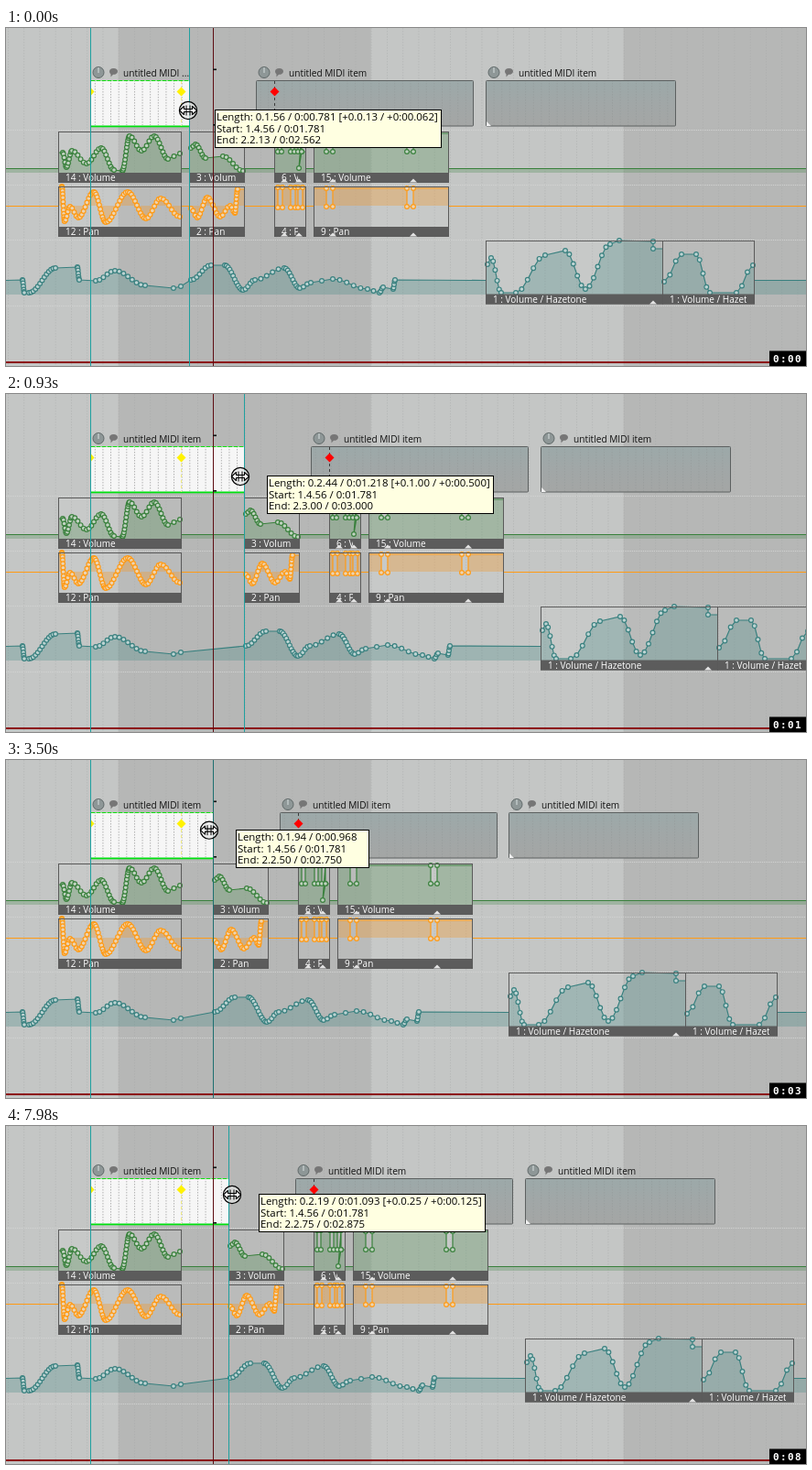
Animation of 874x369 px, one loop 8 s. Source, as an HTML page:

```html
<!DOCTYPE html>
<html lang="en">
<head>
<meta charset="utf-8">
<title>Item edge drag with ripple editing</title>
<style>
html, body { margin: 0; width: 100%; height: 100%; overflow: hidden; background: #b7b8b7; }
svg { display: block; }
text { font-family: "Open Sans", "Noto Sans", sans-serif; white-space: pre; }
.name { font-size: 10.15px; fill: #111; }
.label { font-size: 10px; fill: #fff; }
.tip { font-size: 11.45px; fill: #000; }
.clock { font: bold 11px "DejaVu Sans Mono", monospace; letter-spacing: 1.4px; fill: #fff; }
</style>
</head>
<body>
<script>
const W = 874, H = 369, LOOP = 8000, TICK = 135;
const START = 92.55, BEAT = 69, GRID = BEAT / 8, BAR_X = 122.7, PLAY_X = 226;
const GREEN = { line: '#39803c', fill: '#39803c', alpha: 0.26, dot: '#c0d2c0' };
const ORANGE = { line: '#ff9a14', fill: '#f09a30', alpha: 0.36, dot: '#ecd4b2' };
const TEAL = { line: '#39807f', fill: '#39807f', alpha: 0.27, dot: '#bcd3d2' };

// Pointer path: screen tick, x, y.
const POINTER = [[-1, 199, 90], [2, 222.4, 90], [6, 256, 90], [11, 257, 90], [14, 205, 89], [16, 223, 88],
  [18, 223, 88], [23, 222, 77], [29, 222, 76], [30, 222.5, 65], [36, 223, 67], [38, 222, 61],
  [47, 222, 80], [48, 217.5, 71], [53, 217.5, 71], [54, 230, 75], [58, 247, 75]];
// Edge drags in ticks; `base` is the item's length in grid steps at the press.
const DRAGS = [
  { from: -1, to: 19, grab: 190, base: 0 },
  { from: 25, to: 27, grab: 222, base: 4 },
  { from: 33, to: 36, grab: 222.5, base: 4 },
  { from: 56, to: 60, grab: 230, base: 4 }
];

function set(node, attrs) {
  for (const key in attrs) node.setAttribute(key, attrs[key]);
}
function el(parent, tag, attrs, text) {
  const node = document.createElementNS('http://www.w3.org/2000/svg', tag);
  set(node, attrs);
  if (text !== undefined) node.textContent = text;
  parent.appendChild(node);
  return node;
}
const rect = (parent, x, y, width, height, fill, more) =>
  el(parent, 'rect', { x, y, width, height, fill, ...more });
const line = (parent, x1, y1, x2, y2, stroke, more) =>
  el(parent, 'line', { x1, y1, x2, y2, stroke, ...more });
const path = (parent, d, more) => el(parent, 'path', { d, ...more });
const show = (node, on) => set(node, { display: on ? 'inline' : 'none' });
const move = (node, x, y) => set(node, { transform: `translate(${x} ${y})` });

// Eased curve through its turning points, with a node every `rise` pixels of height.
function wave(rise, ...knots) {
  const out = [knots[0]];
  for (let i = 1; i < knots.length; i++) {
    const [x0, y0] = knots[i - 1], [x1, y1] = knots[i];
    const n = Math.max(1, Math.round(Math.max(Math.abs(y1 - y0) / rise, (x1 - x0) / 25)));
    for (let k = 1; k <= n; k++) {
      const u = k / n;
      out.push([x0 + (x1 - x0) * u, y0 + (y1 - y0) * (1 - Math.cos(Math.PI * u)) / 2]);
    }
  }
  return out;
}
const trace = pts => 'M' + pts.map(p => p.join(' ')).join('L');
const area = (pts, y) => `${trace(pts)}L${pts[pts.length - 1][0]} ${y}L${pts[0][0]} ${y}Z`;

function dots(parent, pts, tone) {
  for (const [cx, cy] of pts) {
    el(parent, 'circle', { cx, cy, r: 2.4, fill: tone.dot, stroke: tone.line, 'stroke-width': 1.15 });
  }
}
// Automation item: curve, label bar and frame.
function block(parent, x, y, w, h, label, tone, floor, pts) {
  const full = [[x + 1, pts[0][1]], ...pts, [x + w - 1, pts[pts.length - 1][1]]];
  rect(parent, x, y, w, h, '#fff', { 'fill-opacity': 0.05 });
  path(parent, area(full, floor), { fill: tone.fill, 'fill-opacity': tone.alpha });
  path(parent, trace(full), { fill: 'none', stroke: tone.line, 'stroke-width': 1.2 });
  dots(parent, pts, tone);
  rect(parent, x, y + h - 11, w, 11, '#5c5c5c');
  const clip = el(parent, 'svg', { x: x + 8, y: y + h - 12, width: w - 17, height: 14 });
  el(clip, 'text', { x: 0, y: 10.3, class: 'label' }, label);
  rect(parent, x + 0.5, y + 0.5, w - 1, h - 1, 'none', { stroke: '#5a5a5a' });
}
const volume = (parent, x, w, label, pts) => block(parent, x, 113, w, 56, label, GREEN, 158, pts);
const pan = (parent, x, w, label, pts) => block(parent, x, 173, w, 55, label, ORANGE, 194, pts);
const synth = (parent, x, w, pts) => block(parent, x, 232, w, 69.5, '1 : Volume / Hazetone', TEAL, 291, pts);
const notch = (parent, x, y) => path(parent, `M${x - 4} ${y}l4 -4 4 4Z`, { fill: '#e4e4e4' });

function header(parent, x, name) {
  el(parent, 'circle', { cx: x + 9, cy: 48.5, r: 6, fill: '#8e9797', stroke: '#5f6868' });
  line(parent, x + 9, 43, x + 9, 49, '#d8e0e0');
  path(parent, `M${x + 21} 47.5a4.5 3.5 0 0 1 9 0a4.5 3.5 0 0 1 -5 3.3l-2.5 2.6v-3a4 3.5 0 0 1 -1.5 -2.9Z`,
    { fill: '#767676' });
  return el(parent, 'text', { x: x + 36, y: 53, class: 'name' }, name);
}
// Take marker with its dashed stem.
function marker(parent, x, fill, stem) {
  line(parent, x, 58, x, 107, stem, { 'stroke-dasharray': '3 3' });
  path(parent, `M${x} 64.5l5 5 -5 5 -5 -5Z`, { fill });
}

const svg = el(document.body, 'svg', { viewBox: `0 0 ${W} ${H}`, width: '100%', height: '100%' });
const defs = el(svg, 'defs');
function grid(id, x, width, color) {
  const p = el(defs, 'pattern', { id, x, y: 0, width, height: 3, patternUnits: 'userSpaceOnUse' });
  rect(p, 0, 0, 1, 1.5, color);
}
grid('back', BAR_X, GRID * 2, '#a2a4a3');
grid('light', BAR_X, GRID, '#b0b0b0');
grid('dim', 0, GRID, '#8b9090');
const shade = el(defs, 'linearGradient', { id: 'shade', x2: 0, y2: 1 });
['#9ca9a9', '#a1a7a7', '#a4a6a5'].forEach((color, i) => el(shade, 'stop', { offset: i / 2, 'stop-color': color }));

// Ruler stripes and tracks
rect(svg, 0, 0, W, H, '#c4c6c5');
for (const x of [BAR_X, BAR_X + 8 * BEAT]) rect(svg, x, 0, 4 * BEAT, H, '#b6b7b6');
rect(svg, 0, 0, W, H, 'url(#back)', { opacity: 0.4 });
for (const y of [111.5, 171.5, 231.5, 303.5]) line(svg, 0, y, W, y, '#d3d4d3', { 'stroke-dasharray': '1 1' });
rect(svg, 0, 364, W, 2, '#8c0a10');

// Lines of the envelopes outside their items
const volFill = path(svg, '', { fill: GREEN.fill, 'fill-opacity': GREEN.alpha });
const volLine = path(svg, '', { stroke: GREEN.line });
const panLine = path(svg, '', { stroke: ORANGE.line });
const synthFill = path(svg, '', { fill: TEAL.fill, 'fill-opacity': TEAL.alpha });
const synthLine = path(svg, '', { fill: 'none', stroke: TEAL.line, 'stroke-width': 1.1 });

// `near` and `far` follow the dragged edge, each snapped to whole pixels.
const fixed = el(svg, 'g'), near = el(svg, 'g'), far = el(svg, 'g');

volume(fixed, 57, 135, '14 : Volume', wave(3, [62, 136], [66, 152], [72, 134], [88, 148], [104, 131],
  [118, 155], [127, 156], [135, 118], [148, 134], [162, 118], [177, 143], [190, 137]));
pan(fixed, 57, 135, '12 : Pan', wave(3, [61, 173], [64, 211], [70, 195], [79, 207], [96, 179],
  [109, 212], [133, 179], [153, 208], [169, 186], [190, 206]));
volume(near, 0, 61, '3 : Volum', wave(2.6, [2, 131], [7, 127], [18, 142], [37, 140], [59, 156]));
pan(near, 0, 61, '2 : Pan', wave(3, [2, 197], [9, 207], [20, 185], [34, 206], [45, 194], [50, 202], [53, 176]));

// Square gates: down to `low` for a few pixels after each start.
const gates = (top, low, width, ...starts) =>
  starts.flatMap(x => [[x, top], [x, low], [x + width, low], [x + width, top]]);
volume(near, 93, 35, '6 : Volume', gates(114, 135, 4, 97, 111, 119).concat([[120, 153], [123, 135]]));
pan(near, 93, 35, '4 : Pan', gates(174, 196, 5, 97, 111, 119));
volume(near, 136, 148, '15 : Volume', gates(115, 135, 7, 150, 238));
pan(near, 136, 148, '9 : Pan', gates(175, 195, 7, 150, 238));
for (const x of [104, 120, 157, 245]) {
  notch(near, x, 168.5);
  notch(near, x, 227.5);
}
synth(far, 0, 194, wave(8, [2, 258], [6, 251], [17, 289], [33, 289], [65, 248], [87, 243], [109, 285],
  [136, 236], [146, 232], [183, 233], [183, 241]));
synth(far, 193, 101, wave(10, [195, 277], [214, 247], [230, 247], [245, 289], [274, 289], [292, 259]));
notch(far, 183, 301.5);

const synthA = wave(2.2, [18, 275], [20, 289], [25, 289], [54, 262], [78, 261], [80, 275], [98, 276],
  [119, 265], [152, 281], [183, 284], [191, 282]);
const synthB = wave(2.4, [2, 275], [24, 259], [39, 259], [59, 286], [72, 275], [104, 262], [121, 284],
  [133, 278], [157, 274], [195, 285], [208, 289], [212, 283], [223, 285], [225, 275]);
dots(fixed, synthA, TEAL);
dots(near, synthB, TEAL);

// Media items
function midi(parent, x, w) {
  const box = fill => [parent, x + 0.5, 57.5, w, 49.5, fill];
  rect(...box('url(#shade)'));
  rect(...box('url(#dim)'), { opacity: 0.4 });
  rect(...box('none'), { stroke: '#5c6060', rx: 1 });
  path(parent, `M${x + 1} 102l5 5h-5Z`, { fill: '#f2f2f2' });
  header(parent, x, 'untitled MIDI item');
}
midi(near, 73, 237);
midi(far, 0, 207);
marker(near, 93.5, '#f00', '#3c3c3c');

const body = rect(svg, START, 57, 0, 51, '#f6f6f6');
const bodyGrid = rect(svg, START, 58, 0, 48, 'url(#light)');
const bodyEdge = rect(svg, 92.5, 57.5, 0, 50, 'none', { stroke: '#12dc12', 'stroke-dasharray': '5 1' });
const bodyBase = rect(svg, START, 106.5, 0, 1.8, '#00e010');
path(svg, 'M92 64.5l4.5 5 -4.5 5Z', { fill: '#f8f000' });
marker(svg, 191.5, '#fff200', '#f0ec80');
const name = header(svg, 92, '');

// Play position, edge guides
line(svg, PLAY_X + 0.5, 0, PLAY_X + 0.5, H, '#5e0d12');
for (const y of [44.5, 105]) rect(svg, PLAY_X, y, 4, 1.6, '#111');
const bracket = rect(svg, PLAY_X + 0.8, 45, 1.5, 61, '#2a0a0c');
const guides = el(svg, 'g');
line(guides, 92.5, 0, 92.5, H, '#1fa09f');
const edgeGuide = line(guides, 0, 0, 0, H);

const tip = el(svg, 'g');
const tipBox = rect(tip, 0.5, 0.5, 0, 41, '#ffffe1', { stroke: '#000' });
const tipText = [12, 25, 37].map(y => el(tip, 'text', { x: 2, y, class: 'tip' }));

// Pointers
const ink = { fill: '#fff', stroke: '#000', 'stroke-width': 1.1, 'stroke-linejoin': 'round' };
const pointers = { drag: el(svg, 'g'), hover: el(svg, 'g'), arrow: el(svg, 'g') };
el(pointers.drag, 'circle', { r: 9.6, fill: '#e6e6e6', 'fill-opacity': 0.7, stroke: '#000', 'stroke-width': 1.2 });
path(pointers.drag, 'M-9.5 0l5 -4.5v3h9v-3l5 4.5 -5 4.5v-3h-9v3Z', ink);
path(pointers.drag, 'M-2 -5.5V5.5M2 -5.5V5.5', { stroke: '#000' });
path(pointers.hover, 'M-13 0l5 -4.5v3h16v-3l5 4.5 -5 4.5v-3h-16v3Z', ink);
path(pointers.hover, 'M-5.5 6V-6H2q3.5 1 3.5 5V6Z', ink);
path(pointers.arrow, 'M0 0V16.5l3.8 -3.6 3 7 2.6 -1.1 -3 -6.9h5.3Z', ink);

rect(svg, 834, 352.5, 40, 16.5, '#000');
const clock = el(svg, 'text', { x: 838, y: 364.5, class: 'clock' });

const pad = (n, size) => String(n).padStart(size, '0');
const beats = (b, first) =>
  `${Math.floor(b / 4) + first}.${Math.floor(b % 4) + first}.${pad(Math.round(b % 1 * 100), 2)}`;
const clockTime = s => `0:${pad(Math.floor(s), 2)}.${pad(Math.floor(s % 1 * 1000), 3)}`;
const both = (b, first) => `${beats(b, first)} / ${clockTime(b / 2)}`;

function pointerAt(tick) {
  const i = Math.max(1, POINTER.findIndex(p => p[0] >= tick));
  const [t0, x0, y0] = POINTER[i - 1], [t1, x1, y1] = POINTER[i];
  const u = (tick - t0) / (t1 - t0);
  return [x0 + (x1 - x0) * u, y0 + (y1 - y0) * u];
}

function drawLanes(edge, farX) {
  const gaps = [[0, 57], [192, edge], [edge + 61, edge + 93], [edge + 128, edge + 136], [edge + 284, W]];
  const rule = y => gaps.map(([a, b]) => `M${a} ${y}H${b}`).join('');
  set(volLine, { d: rule(153.5) });
  set(volFill, { d: gaps.map(([a, b]) => `M${a} 153.5H${b}V158H${a}Z`).join('') });
  set(panLine, { d: rule(194.5) });
  const curve = [[0, 275.5], ...synthA, ...synthB.map(([x, y]) => [x + edge, y]), [farX, 275.5]];
  const tail = Math.min(W, farX + 294);
  set(synthLine, { d: `${trace(curve)}M${tail} 275.5H${W}` });
  set(synthFill, { d: `${area(curve, 291)}M${tail} 275.5H${W}V291H${tail}Z` });
}

function drawTip(x, y, length, shift) {
  const change = shift ? ` [+${beats(shift / 8, 0)} / +${clockTime(shift / 16)}]` : '';
  const start = 3.5625;
  move(tip, Math.round(x) + 29, Math.round(y) - 1);
  set(tipBox, { width: shift ? 247 : 145 });
  tipText[0].textContent = `Length: ${both(length, 0)}${change}`;
  tipText[1].textContent = `Start: ${both(start, 1)}`;
  tipText[2].textContent = `End: ${both(start + length, 1)}`;
}

function render(tick) {
  const [x, y] = pointerAt(tick);
  const drag = DRAGS.find(d => tick >= d.from && tick < d.to);
  const shift = drag ? Math.round((x - drag.grab) / GRID) : 0;
  const length = 1.4375 + ((drag ? drag.base : 4) + shift) / 8;
  const end = START + length * BEAT;
  const edge = Math.floor(end), farX = Math.floor(end + 323.7);

  move(near, edge, 0);
  move(far, farX, 0);
  drawLanes(edge, farX);
  for (const part of [body, bodyGrid, bodyEdge, bodyBase]) set(part, { width: edge - 92 });
  name.textContent = edge < 214 ? 'untitled MIDI ...' : 'untitled MIDI item';

  for (const part of [guides, tip]) show(part, drag);
  show(bracket, !drag);
  set(edgeGuide, { x1: edge + 0.5, x2: edge + 0.5, stroke: edge === PLAY_X ? '#1d6f70' : '#1fa09f' });
  if (drag) drawTip(x, y, length, shift);

  const kind = drag ? 'drag' : tick >= 48 && tick < 54 ? 'arrow' : 'hover';
  for (const key in pointers) show(pointers[key], key === kind);
  move(pointers[kind], x, y);
  clock.textContent = '0:' + pad(Math.floor((tick + 1.6) * 0.1355), 2);
}

const origin = performance.now();
let last;
function frame() {
  const t = (performance.now() - origin) % LOOP;
  const tick = Math.floor((t - 120) / TICK);
  if (tick !== last) render(last = tick);
  requestAnimationFrame(frame);
}
frame();
</script>
</body>
</html>
```
